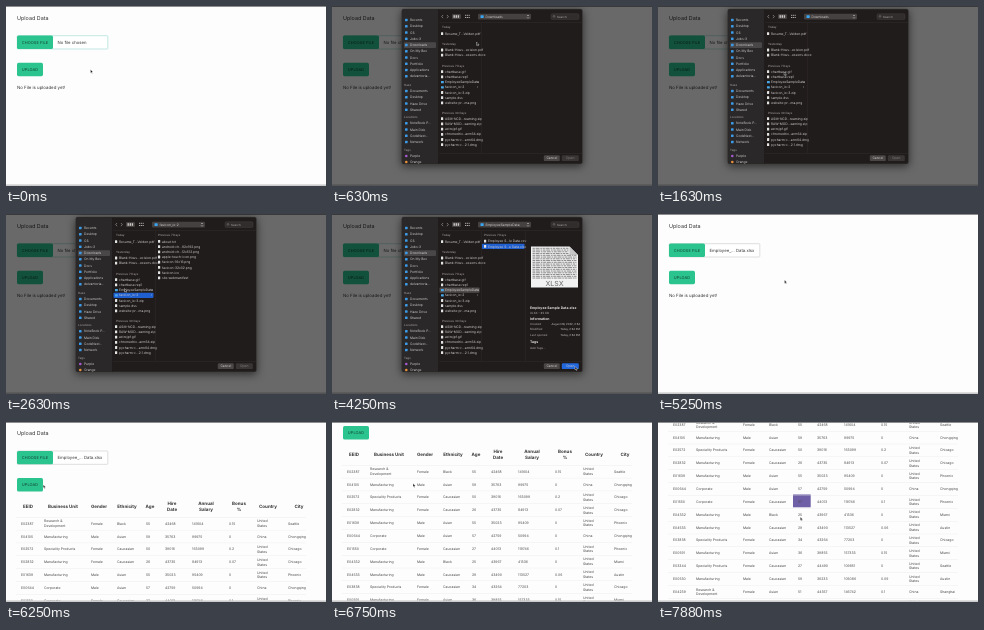
Animation, 320 px wide and 180 px high, one loop 8000 ms. Source, as an HTML page:

```html
<!DOCTYPE html>
<html lang="en">
<head>
<meta charset="utf-8">
<title>Upload Data</title>
<style>
  html, body { margin: 0; width: 100%; height: 100%; overflow: hidden; background: #fdfdfd; }
  svg { display: block; width: 100vw; height: 100vh; }
  text { font-family: Inter, "Open Sans", sans-serif; text-rendering: geometricPrecision; white-space: pre; }
  #dialog text { font-size: 3.3px; fill: #cfcccb; }
  #dialog .dim { fill: #8f8a88; font-weight: 600; font-size: 2.9px; }
  #dialog .bold { fill: #e6e4e3; font-weight: 700; font-size: 3.45px; }
  #table text { font-size: 3.45px; fill: #4a4a4a; }
  #table .head { font-size: 4.5px; font-weight: 700; fill: #333; text-anchor: middle; }
  .mid { text-anchor: middle; }
  .panel { filter: drop-shadow(0 2px 4px rgba(0, 0, 0, .6)); }
</style>
</head>
<body>
<svg id="stage" viewBox="0 0 320 180" preserveAspectRatio="none">
  <rect width="320" height="180" fill="#fdfdfd"/>
  <g id="page"></g>
  <rect width="320" height="1" fill="#8c8c8c"/>
  <rect y="178.4" width="320" height="1.6" fill="#cbcbcb"/>
  <rect id="shade" width="320" height="180" fill="#000"/>
  <g id="dialog"></g>
  <path id="cursor" d="M0 0V3.4L.8 2.7 1.4 4 2 3.7 1.4 2.5H2.5Z" fill="#111" stroke="#fff" stroke-width=".35"/>
</svg>
<script>
const LOOP = 8000;
const SVG = "http://www.w3.org/2000/svg";
const $ = id => document.getElementById(id);

function add(parent, tag, attrs = {}, label) {
  const node = document.createElementNS(SVG, tag);
  for (const key in attrs) node.setAttribute(key, attrs[key]);
  if (label !== undefined) node.textContent = label;
  return parent.appendChild(node);
}
const group = (parent, id) => add(parent, "g", { id });
const box = (parent, x, y, width, height, fill, more = {}) =>
  add(parent, "rect", { x, y, width, height, fill, ...more });
// y is the middle of the line
const write = (parent, x, y, label, more = {}) =>
  add(parent, "text", { x, y, dy: ".35em", ...more }, label);

// Page
const page = $("page");
write(page, 11, 12, "Upload Data", { "font-size": 5.4, fill: "#333" });
const field = box(page, 11.3, 29.7, 90.5, 13.3, "#fff", { rx: .6, "stroke-width": .7 });
function button(x, y, width, label) {
  box(page, x, y, width, 13.4, "#2bc48f", { rx: 1.6 });
  write(page, x + width / 2, y + 6.8, label,
    { class: "mid", "font-size": 3.9, "letter-spacing": .1, fill: "#123c2e" });
}
button(11, 29.6, 36, "CHOOSE FILE");
button(11, 56.8, 26, "UPLOAD");
const fileName = write(page, 51.5, 36.4, "", { "font-size": 4.25, fill: "#333" });
const notice = write(page, 11, 81, "No File is uploaded yet!", { "font-size": 4.35, fill: "#333" });

// Table
const table = group(page, "table");
const headers = [[22, "EEID"], [57, "Business Unit"], [93, "Gender"], [121, "Ethnicity"], [144, "Age"],
  [166, "Hire|Date"], [200, "Annual|Salary"], [233, "Bonus|%"], [262, "Country"], [293, "City"]];
const columns = [15, 38, 85, 111, 140, 159, 186, 223, 251, 282];
const units = { M: "Manufacturing", S: "Speciality Products", C: "Corporate", R: "Research &|Development" };
const rows = `E02387 R F Black 55 42468 141604 0.15 Seattle
E04105 M M Asian 59 35763 99975 0 Chongqing
E02572 S F Caucasian 50 39016 163099 0.2 Chicago
E02832 M F Caucasian 26 43735 84913 0.07 Chicago
E01639 M M Asian 55 35023 95409 0 Phoenix
E00644 C M Asian 57 42759 50994 0 Chongqing
E01550 C F Caucasian 27 44013 119746 0.1 Phoenix
E04332 M M Black 25 43967 41336 0 Miami
E04533 M M Caucasian 29 43490 113527 0.06 Austin
E03838 S F Caucasian 34 43264 77203 0 Chicago
E00591 M F Asian 36 39855 157333 0.15 Miami
E03344 S F Caucasian 27 44490 109851 0 Seattle
E00530 M M Caucasian 59 36233 105086 0.09 Austin
E04239 R F Asian 51 44357 146742 0.1 Shanghai
E04332 M M Black 31 43043 97078 0 Austin`.split("\n");
const ROW = 12.85, FIRST = 102.2;

function lines(x, y, label, gap, more) {
  const parts = label.split("|");
  parts.forEach((part, i) => write(table, x, y + (i - (parts.length - 1) / 2) * gap, part, more));
}
const rule = y => box(table, 10, y, 290, .3, "#e2e2e2");
headers.forEach(([x, label]) => lines(x, 85.4, label, 6.3, { class: "head" }));
rule(FIRST - ROW / 2);
const marked = box(table, 135, FIRST + 6 * ROW - 7.2, 17.7, 12.8, "#6f5fa6");
rows.forEach((row, i) => {
  const [id, unit, sex, origin, age, hired, pay, bonus, city] = row.split(" ");
  const country = /Chong|Shang/.test(city) ? "China" : "United|States";
  const cells = [id, units[unit], sex === "F" ? "Female" : "Male", origin, age, hired, pay, bonus, country, city];
  const y = FIRST + i * ROW;
  cells.forEach((cell, c) => lines(columns[c], y, cell, 4.5));
  rule(y + ROW / 2);
});

// File dialog
const dialog = $("dialog");
box(dialog, 69.7, 3, 180.8, 155, "#211c1c", { rx: 2, stroke: "#4b4745", "stroke-width": .4, class: "panel" });
box(dialog, 70, 3.3, 36.7, 154.4, "#2b2829", { rx: 1.8 });
box(dialog, 106.7, 3.3, .3, 154.4, "#0f0d0d");
box(dialog, 107, 16.6, 143.3, .3, "#3a3635");

box(dialog, 72, 36.3, 32, 5.6, "#4a4748", { rx: 1 });
function place(y, label, colour) {
  const round = colour !== "#3b9be8";
  box(dialog, 73, y - 1.3, 2.6, 2.6, colour, { rx: round ? 1.3 : .6 });
  write(dialog, 78, y, label);
}
function places(y, labels, colour = "#3b9be8") {
  labels.forEach((label, i) => place(y + i * 6.25, label, colour));
}
places(14, ["Recents", "Desktop", "CS", "Jobs-3", "Downloads", "On My Box", "Docs", "Portfolio", "Applications", "delvantoria…"]);
places(85, ["Documents", "Desktop", "Haze Drive", "Shared"]);
places(117.3, ["NoteBook P…", "Main Disk", "CodeNest…", "Network"]);
place(150, "Purple", "#a45bd0");
place(156, "Orange", "#e8903a");
[[79, "Haze"], [111, "Locations"], [144, "Tags"]].forEach(([y, label]) => write(dialog, 72, y, label, { class: "dim" }));

// Toolbar
add(dialog, "path", { d: "M111 9l-1.3 1.6 1.3 1.6M115 9l1.3 1.6-1.3 1.6", fill: "none", stroke: "#aaa", "stroke-width": .6 });
box(dialog, 120, 8, 9, 5, "#454140", { rx: 1 });
[121.5, 123.6, 125.7].forEach(x => box(dialog, x, 9.2, 1.4, 2.6, "#c9c5c3"));
add(dialog, "path", { d: "M133 9.3h5M133 11.5h5", stroke: "#aaa", "stroke-width": 1, "stroke-dasharray": "1.2 .6" });
box(dialog, 146, 7.7, 53, 5.8, "#454140", { rx: 1.2 });
box(dialog, 148.5, 9.3, 3.2, 2.6, "#3ba4ee", { rx: .5 });
const title = write(dialog, 153.5, 10.7, "");
add(dialog, "path", { d: "M195 10l1-1 1 1M195 11.3l1 1 1-1", fill: "none", stroke: "#ddd", "stroke-width": .5 });
box(dialog, 219, 7.7, 28, 5.8, "#312d2c", { rx: 1.2, stroke: "#514d4b", "stroke-width": .3 });
add(dialog, "circle", { cx: 222, cy: 10.4, r: .9, fill: "none", stroke: "#999", "stroke-width": .4 });
write(dialog, 225, 10.7, "Search", { class: "dim" });

// File lists
const pick = box(dialog, 107.5, 0, 40, 5.2, "#1f5fd0", { rx: .8 });
function files(parent, x, y, names) {
  names.forEach((name, i) => {
    const line = y + i * 5.2, folder = !name.includes(".");
    box(parent, x, line - (folder ? 1.1 : 1.4), folder ? 2.8 : 2.2, folder ? 2.2 : 2.8,
      folder ? "#48a9ea" : "#e4e4e4", { rx: .3 });
    write(parent, x + 4, line, name);
    if (folder) write(parent, 145, line, "›");
  });
}
[[21, "Today"], [38, "Yesterday"], [60, "Previous 7 Days"], [107, "Previous 30 Days"]]
  .forEach(([y, label]) => write(dialog, 110, y, label, { class: "dim" }));
files(dialog, 109, 27.6, ["Resume_T…Velden.pdf"]);
files(dialog, 109, 44, ["Blank-Hous…ecision.pdf", "Blank-Hous…essons.docx"]);
files(dialog, 109, 65.7, ["chartbase.gif", "chartbase.rep1", "EmployeeSampleData", "favicon_io-2",
  "favicon_io-3.zip", "sample.dss", "website-pr…ma.png"]);
files(dialog, 109, 112.7, ["ASM-NCD…reaming.zip", "RAW-MOD…eaming.zip", "astrojpf.gif", "chromedriv…arm64.zip",
  "pycharm-c…arm64.dmg", "pycharm-c…2.1.dmg"]);
box(dialog, 149.3, 17, .3, 130, "#3a3635");

const icons = group(dialog, "icons");
write(icons, 152, 21, "Previous 7 Days", { class: "dim" });
files(icons, 152, 27.4, ["about.txt", "android-ch…92x192.png", "android-ch…12x512.png", "apple-touch-icon.png",
  "favicon-16x16.png", "favicon-32x32.png", "favicon.ico", "site.webmanifest"]);

const sheets = group(dialog, "sheets");
write(sheets, 152, 21, "Previous 7 Days", { class: "dim" });
const sheetPick = box(sheets, 150, 29.8, 42.5, 5.2, "#1f5fd0", { rx: .8 });
files(sheets, 152, 27.2, ["Employee S…le Data.csv", "Employee S…e Data.xlsx"]);

// Preview
const preview = group(dialog, "preview");
box(preview, 193.3, 17, .3, 130, "#3a3635");
add(preview, "path", { d: "M199 32.5h38.5l8.5 8.5v32.5h-47z", fill: "#f2f2f2" });
add(preview, "path", { d: "M237.5 32.5l8.5 8.5h-8.5z", fill: "#c6c6c6" });
for (let i = 0; i < 18; i++)
  add(preview, "path", { d: `M200.5 ${34.3 + i * 1.75}H${i < 4 ? 236.5 : 244.5}`, stroke: "#777", "stroke-width": .85,
    "stroke-dasharray": `${2.3 + i % 3 * .3} .7 4 .8 1.6 .7` });
write(preview, 222.5, 69.5, "XLSX", { class: "mid", style: "font-size:7px;fill:#777;font-weight:500" });
const info = [[93.6, "Employee Sample Data.xlsx", "bold"], [99, "XLSX – 85 KB", "dim"], [105, "Information", "bold"],
  [110.2, "Created", "dim"], [115.4, "Modified", "dim"], [120.6, "Last opened", "dim"], [128, "Tags", "bold"], [134, "Add Tags…", "dim"]];
info.forEach(([y, label, look]) => write(preview, 198, y, label, { class: look }));
["August 28, 2022, 2:54", "Today, 2:54 PM", "Today, 2:54 PM"]
  .forEach((label, i) => write(preview, 248, 110.2 + i * 5.2, label, { style: "text-anchor:end;font-size:2.7px" }));

box(dialog, 107, 147, 143.3, .3, "#3a3635");
box(dialog, 211.8, 149.3, 16, 5.8, "#4a4645", { rx: 1.2 });
const open = box(dialog, 229.8, 149.3, 17, 5.8, "#393534", { rx: 1.2 });
write(dialog, 219.8, 152.3, "Cancel", { class: "mid" });
const openLabel = write(dialog, 238.3, 152.3, "Open", { class: "mid" });

// Motion: [time, ...values]
const pointer = [[0, 84.5, 63.5], [300, 86, 60], [600, 144.5, 36], [1100, 144.5, 36], [1650, 126, 66], [2150, 118, 80],
  [2350, 118, 80], [2600, 118.5, 74.5], [2900, 118.5, 74.5], [3150, 168, 31], [3450, 168, 31], [4150, 243, 152.5],
  [4420, 243, 152.5], [5200, 127, 66], [5300, 126, 66], [5650, 25, 63], [6100, 25, 63], [6600, 81, 61.5],
  [7050, 81, 61.5], [7750, 142.3, 95]];
const scrolling = [[6220, 0], [6680, 52.7], [7050, 52.7], [7780, 99.6]];

function at(track, t) {
  const next = track.findIndex(key => key[0] > t);
  if (next === 0) return track[0].slice(1);
  if (next < 0) return track[track.length - 1].slice(1);
  const a = track[next - 1], b = track[next];
  const p = (t - a[0]) / (b[0] - a[0]), ease = p * p * (3 - 2 * p);
  return a.slice(1).map((v, i) => v + (b[i + 1] - v) * ease);
}
const show = (node, on) => node.setAttribute("visibility", on ? "inherit" : "hidden");

function draw(t) {
  const opened = t >= 375 && t < 4380;
  const iconsOpen = t >= 2250 && t < 2870, sheetsOpen = t >= 2870, picked = t >= 3250;
  const chosen = t >= 4380, loaded = t >= 5870;

  show(dialog, opened);
  $("shade").setAttribute("opacity", t < 4500 ? .585 * Math.min(1, Math.max(0, (t - 250) / 125)) : 0);
  show(pick, t >= 2250);
  pick.setAttribute("y", sheetsOpen ? 73.5 : 78.7);
  pick.setAttribute("fill", picked ? "#504c4b" : "#1f5fd0");
  show(icons, iconsOpen);
  show(sheets, sheetsOpen);
  show(sheetPick, picked);
  show(preview, picked);
  open.setAttribute("fill", picked ? "#2267dc" : "#393534");
  openLabel.setAttribute("opacity", picked ? 1 : .5);
  title.textContent = sheetsOpen ? "EmployeeSampleData" : iconsOpen ? "favicon_io-2" : "Downloads";

  fileName.textContent = chosen ? "Employee_… Data.xlsx" : "No file chosen";
  field.setAttribute("stroke", chosen ? "#d2d2d2" : "#a9dfd6");
  show(notice, !loaded);
  show(table, loaded);
  show(marked, t >= 7450);
  page.setAttribute("transform", `translate(0 ${-at(scrolling, t)[0]})`);
  $("cursor").setAttribute("transform", `translate(${at(pointer, t).join(" ")})`);
}

// "inherit" lets hidden parents hide their children
const start = performance.now();
function tick() {
  draw((performance.now() - start) % LOOP);
  requestAnimationFrame(tick);
}
tick();
</script>
</body>
</html>
```
